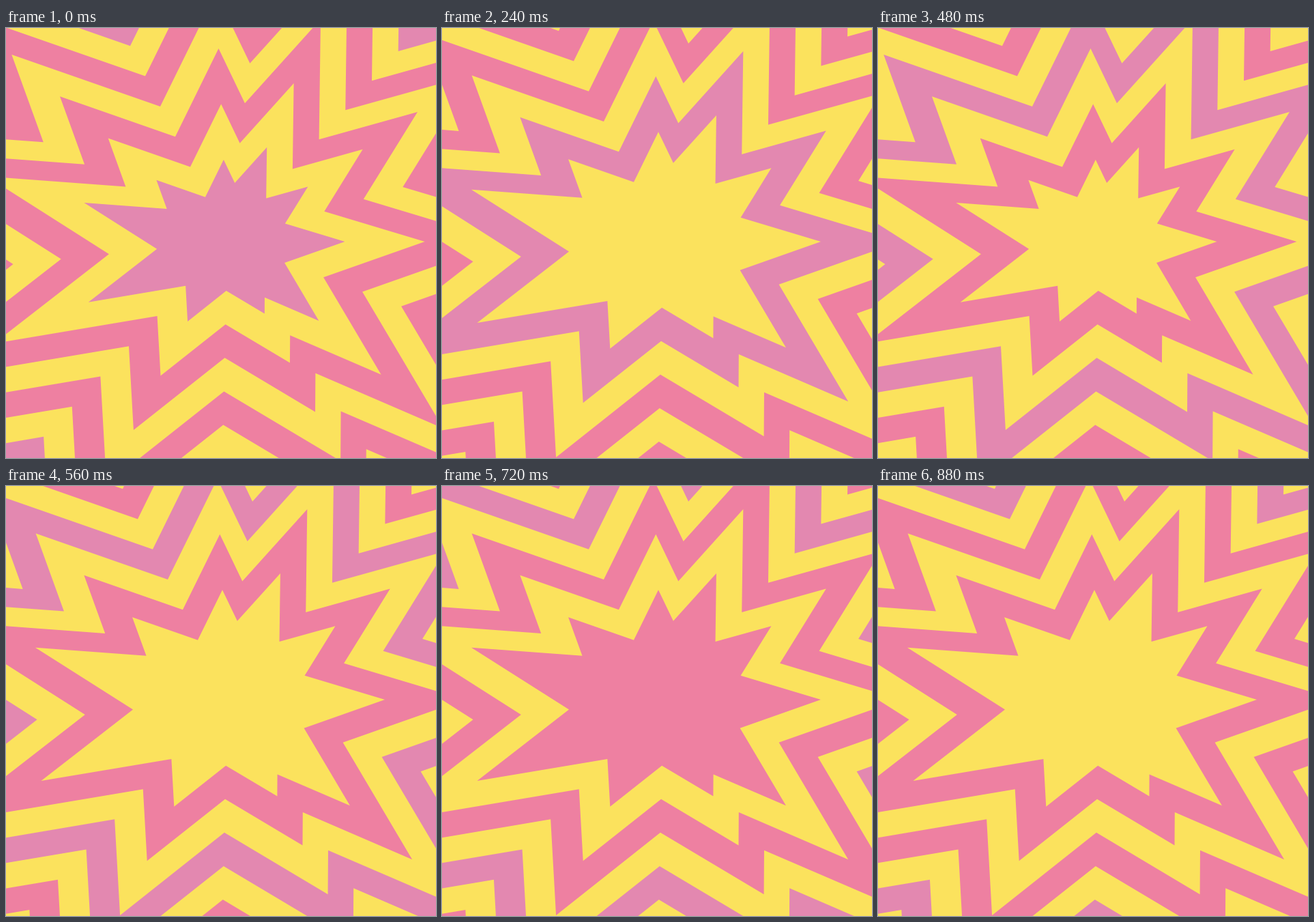
Write an HTML page with a canvas that moves like this. It is 630 px wide and 630 px high and loops after 0.96 s.

```html
<!DOCTYPE html>
<html lang="en">
<head>
<meta charset="utf-8">
<title>Starburst</title>
<style>
  html, body { margin: 0; width: 100%; height: 100%; overflow: hidden; }
  canvas { display: block; width: 630px; height: 630px; }
</style>
</head>
<body>
<canvas width="630" height="630"></canvas>
<script>
const ctx = document.querySelector('canvas').getContext('2d');
const YELLOW = '#fbe25d', PINK = '#ee80a1', PURPLE = '#e388b0';
const STEP_MS = 80, STEPS = 12, OLDEST = 7;

// Hand-drawn star around its centre, clockwise from the top spike
const star = new Path2D(`M-37-815 74-584 394-939 387-431 803-547 575-179
  1171 0 570 212 912 789 372 556 371 719-11 491-396 796-416 442
  -1385 605-702 74-1428-387-603-326-707-613-220-443Z`);

// Yellow alternates with pink; every third pink is purple
const burstColor = i => i % 2 ? YELLOW : i % 6 ? PINK : PURPLE;

function drawStar(size, color) {
  const scale = (size + 2.94) / 20;
  ctx.setTransform(scale, 0, 0, scale, 324.3, 312.9);
  ctx.fillStyle = color;
  ctx.fill(star);
}

function render(now) {
  const step = Math.floor(now / STEP_MS) % STEPS;
  const newest = Math.floor(step / 2) + STEPS;
  // Bursts grow one unit per step; a new one appears every second step
  for (let age = OLDEST; age >= 0; age--) {
    drawStar(2 * age + step % 2, burstColor(newest - age));
  }
}

const start = performance.now();
function frame() {
  render(performance.now() - start);
  requestAnimationFrame(frame);
}
frame();
</script>
</body>
</html>
```
